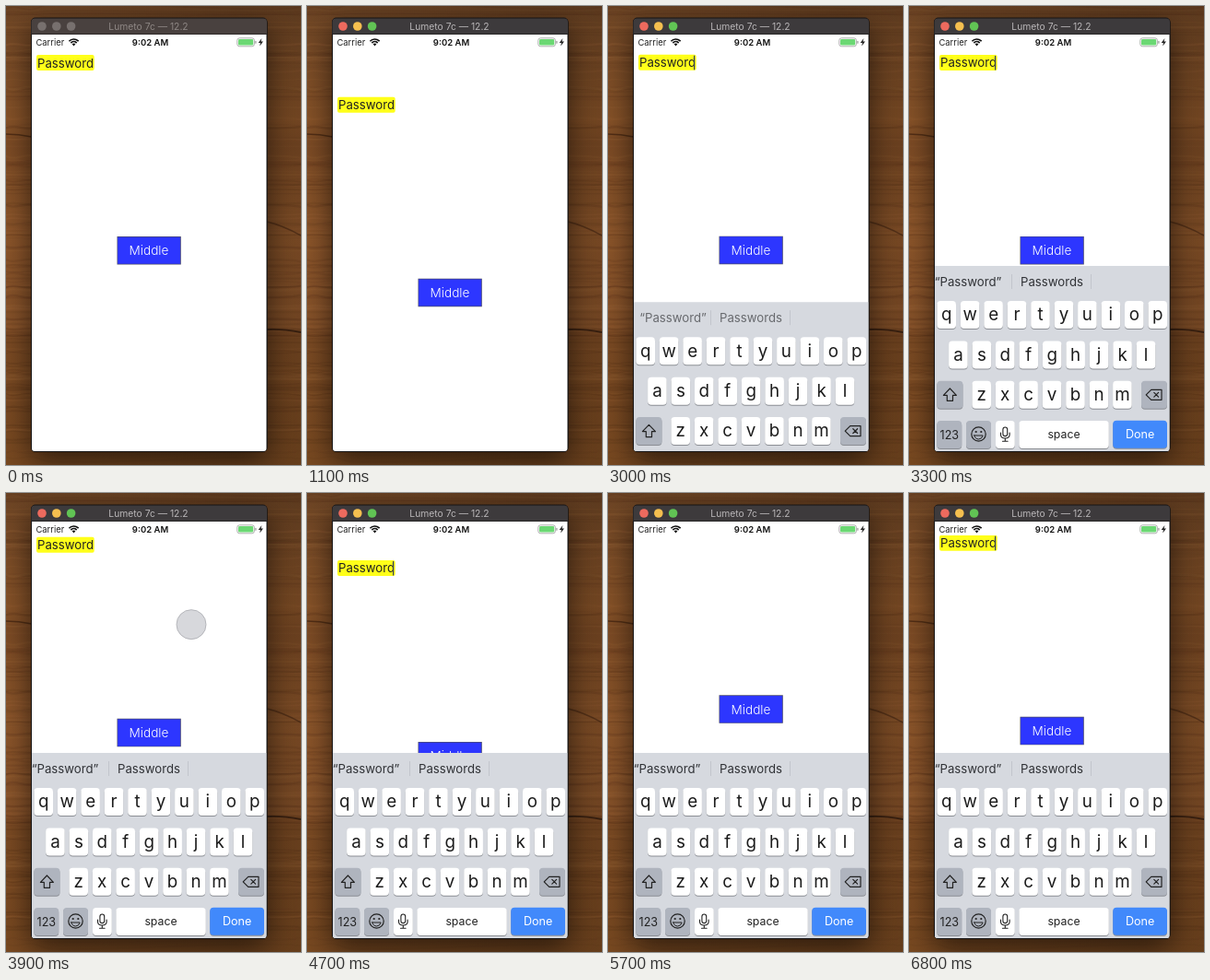
Recreate the animation shown at these times as an HTML page with a canvas. Size 320 by 498 pixels, loop 6900 ms.

```html
<!DOCTYPE html>
<html lang="en">
<head>
<meta charset="utf-8">
<title>Keyboard scroll demo</title>
<style>
  html, body { margin: 0; width: 100%; height: 100%; overflow: hidden; background: #744a2a; }
  canvas { display: block; width: 320px; height: 498px; }
</style>
</head>
<body>
<canvas id="stage"></canvas>
<script>
const W = 320, H = 498, LOOP = 6900, TAU = Math.PI * 2;
const scale = window.devicePixelRatio || 1;
const canvas = document.getElementById('stage');
const wood = document.createElement('canvas');
for (const c of [canvas, wood]) { c.width = W * scale; c.height = H * scale; }
let g = wood.getContext('2d');
g.scale(scale, scale);

// Drags: touch position, then [time, scroll offset] points; released drags spring back.
const SPRING = 225;
const drags = [
  { x: 190, y: 150, keys: [[250, 0], [1000, 71.7]] },
  { x: 195, y: 280, keys: [[1500, 0], [1900, -45]] },
  { x: 66, y: 62, keys: [[2680, 0], [2800, 0]] },
  { x: 201, y: 153, keys: [[3840, 0], [4080, -32], [4550, 39]] },
  { x: 205, y: 210, keys: [[5120, 0], [5550, -60.4]] },
  { x: 200, y: 210, keys: [[6020, 0], [6380, -45]] }
];
const KEYS_START = 2850, KEYS_TIME = 360, KEYS_HEIGHT = 201;

function pull({ keys }, t) {
  if (t <= keys[0][0]) return 0;
  const [end, peak] = keys[keys.length - 1];
  if (t >= end) return peak * Math.exp((end - t) / SPRING);
  const i = keys.findIndex(k => k[0] > t);
  const [t0, a] = keys[i - 1], [t1, b] = keys[i];
  const u = (t - t0) / (t1 - t0);
  return a + (b - a) * u * u * (3 - 2 * u);
}

function box(x, y, w, h, fill, r = 0) {
  g.fillStyle = fill;
  g.beginPath();
  g.roundRect(x, y, w, h, r);
  g.fill();
}

function disc(x, y, r, fill) {
  g.fillStyle = fill;
  g.beginPath();
  g.arc(x, y, r, 0, TAU);
  g.fill();
}

function text(s, x, y, size, fill, align = 'center', weight = 400) {
  g.font = `${weight} ${size}px Inter, Roboto, "Liberation Sans", sans-serif`;
  g.textAlign = align;
  g.textBaseline = 'alphabetic';
  g.fillStyle = fill;
  g.fillText(s, x, y);
}

function line(path, color, width = 1.2) {
  g.strokeStyle = color;
  g.lineWidth = width;
  g.lineCap = g.lineJoin = 'round';
  g.stroke(new Path2D(path));
}

function gradient(x, y, stops) {
  const fill = g.createLinearGradient(0, 0, x, y);
  stops.forEach(([p, c]) => fill.addColorStop(p, c));
  return fill;
}

function paintWood() {
  let seed = 11;
  const rnd = () => (seed = seed * 16807 % 2147483647) / 2147483647;
  box(0, 0, W, H, gradient(0, H, [[0, '#6c4424'], [.25, '#855127'], [.3, '#7b4a24'],
    [.5, '#8a5429'], [.7, '#845028'], [.73, '#794922'], [1, '#774820']]));
  for (let i = 0; i < 170; i++) {
    const y = rnd() * H, bend = (rnd() - .5) * 14, a = .03 + rnd() * .1;
    line(`M0 ${y}C12 ${y + bend} 22 ${y - bend} 40 ${y + bend / 2}S285 ${y - bend} 320 ${y + bend / 3}`,
      rnd() < .65 ? `rgba(48,22,8,${a})` : `rgba(184,126,74,${a})`, .7 + rnd() * 2);
  }
  line('M283 234Q300 238 320 249', 'rgba(50,25,10,.5)', 1.5);
  line('M0 139Q14 139 28 142', 'rgba(50,25,10,.6)', 1.4);
  line('M283 351Q300 350 320 354', '#3a2010', 1.8);
  box(0, 0, W, H, gradient(W, 0, [[0, 'rgba(30,18,8,0)'], [1, 'rgba(30,18,8,.2)']]));
  g.shadowColor = 'rgba(0,0,0,.6)';
  g.shadowBlur = 32 * scale;
  g.shadowOffsetY = 10 * scale;
  box(27, 13, 256.5, 471, '#111', 5);
}

function paintWindow(active) {
  box(27, 12.5, 256.5, 471.5, '#161415', 5);
  box(27.5, 13.5, 255.5, 17, active ? '#3d3a3c' : '#49413f', [4, 4, 0, 0]);
  ['#ed6a5e', '#f5bf4f', '#61c454'].forEach((c, i) =>
    disc(39 + i * 15.8, 22, 4.8, active ? c : '#77706e'));
  text('Lumeto 7c — 12.2', 154.5, 26, 10.3, active ? '#b9b6b8' : '#8e8784');
  box(28, 31, 254.5, 452, '#fff', [0, 0, 3, 3]);
}

function paintStatus() {
  text('Carrier', 32.5, 42.7, 9.4, '#222', 'left');
  text('9:02 AM', 156.5, 42.7, 9.5, '#111', 'center', 600);
  g.strokeStyle = '#111';
  g.lineCap = 'butt';
  g.lineWidth = 1.7;
  for (const r of [7, 4.3]) {
    g.beginPath();
    g.arc(73.5, 43, r, -Math.PI * .76, -Math.PI * .24);
    g.stroke();
  }
  g.fillStyle = '#111';
  g.fill(new Path2D('M73.5 43.5L71.6 41.2Q73.5 39.6 75.4 41.2Z'));
  g.strokeStyle = '#9a9a9a';
  g.lineWidth = .8;
  g.beginPath();
  g.roundRect(250.8, 34.8, 18.6, 9, 2.5);
  g.stroke();
  box(252, 36, 16.2, 6.6, '#6bd873', 1.4);
  box(270.3, 37.8, 1.2, 3, '#9a9a9a', .6);
  g.fillStyle = '#222';
  g.fill(new Path2D('M277.4 35L273.7 40H276L275.2 43.6L279 38.5H276.6Z'));
}

function paintContent(offset, caret) {
  g.save();
  g.beginPath();
  g.rect(28, 46, 254.5, 437);
  g.clip();
  g.translate(0, offset);
  box(33, 53, 62.7, 17, '#ffff1a', 2);
  text('Password', 34, 66.5, 13.2, '#222', 'left');
  if (caret) box(93, 54, 1.2, 15.5, '#33405c');
  box(120.5, 250, 69.3, 30.5, '#4c4c66');
  box(121.2, 250.7, 67.9, 29.1, '#2d36ff');
  text('Middle', 155, 270.3, 13.6, '#fff', 'center', 300);
  g.restore();
}

function key(x, y, w, fill = '#fff') {
  box(x, y + 1, w, 30, '#8b8e94', 4);
  box(x, y, w, 30, fill, 4);
}

function letters(row, x, y) {
  [...row].forEach((c, i) => {
    const mid = x + i * 25.45;
    key(mid - 10.3, y, 20.6);
    text(c, mid, y + 21.2, 18.8, '#1c1c1c');
  });
}

function paintKeyboard(drop) {
  const GREY = '#afb4be', INK = '#222';
  g.save();
  g.beginPath();
  g.roundRect(28, 31, 254.5, 452, [0, 0, 3, 3]);
  g.clip();
  g.translate(0, drop);
  box(28, 282, 254.5, 202, '#d6d9df');
  const sliding = drop > 0, word = sliding ? '#686a6e' : '#303236';
  text('“Password”', sliding ? 70.5 : 64, 303.6, 13.2, word);
  text('Passwords', 155, 303.6, 13.2, word);
  box(111, 291, .8, 16, '#bdc0c7');
  box(197, 291, .8, 16, '#bdc0c7');

  letters('qwertyuiop', 40.7, 320);
  letters('asdfghjkl', 53.4, 363.5);
  letters('zxcvbnm', 78.7, 406.7);
  key(30.4, 406.7, 28, GREY);
  line('M44.4 415L37.4 422.3H41.3V428.3H47.5V422.3H51.4Z', INK);
  key(252, 406.7, 28, GREY);
  line('M257.2 421.8L262.7 416.3H274V427.3H262.7ZM265.8 419.4L270.6 424.2M270.6 419.4L265.8 424.2', INK);

  key(30.4, 450, 26.8, GREY);
  text('123', 43.8, 469.5, 12.6, INK);
  key(62, 450, 27, GREY);
  g.strokeStyle = INK;
  g.lineWidth = 1.2;
  g.beginPath();
  g.arc(75.5, 464.5, 7.7, 0, TAU);
  g.stroke();
  disc(72.7, 462, 1.1, INK);
  disc(78.3, 462, 1.1, INK);
  line('M70.8 466H80.2Q79 470 75.5 470T70.8 466Z', INK, 1);
  key(94, 450, 20.8);
  line('M99.5 463V465.5Q99.8 469 104.3 469T109.1 465.5V463M104.3 469V472.3M101.5 472.3H107.1', INK, 1.1);
  g.strokeStyle = INK;
  g.beginPath();
  g.roundRect(101.9, 457, 4.8, 9.6, 2.4);
  g.stroke();
  key(119.3, 450, 97.5);
  text('space', 168, 468.7, 12.3, INK);
  key(221.2, 449.7, 58.8, '#4189fb');
  text('Done', 250.6, 469, 12.6, '#fff');
  g.restore();
}

function paintTouch(t, offset) {
  const d = drags.find(({ keys }) => t >= keys[0][0] && t < keys[keys.length - 1][0]);
  if (!d) return;
  disc(d.x, d.y + 2 * offset, 16, 'rgba(200,201,207,.72)');
  g.strokeStyle = '#a9aaaf';
  g.lineWidth = .8;
  g.stroke();
}

function draw(t) {
  const offset = drags.reduce((sum, d) => sum + pull(d, t), 0);
  const caret = t >= 2900 && (t - 2900) % 1200 < 700;
  const k = Math.min(1, Math.max(0, (t - KEYS_START) / KEYS_TIME));
  g.setTransform(1, 0, 0, 1, 0, 0);
  g.drawImage(wood, 0, 0);
  g.scale(scale, scale);
  paintWindow(t >= 100);
  paintContent(offset, caret);
  paintStatus();
  if (k > 0) paintKeyboard(KEYS_HEIGHT * (1 - k) ** 3);
  paintTouch(t, offset);
}

paintWood();
g = canvas.getContext('2d');
const start = performance.now();
function tick() {
  draw((performance.now() - start) % LOOP);
  requestAnimationFrame(tick);
}
tick();
</script>
</body>
</html>
```
